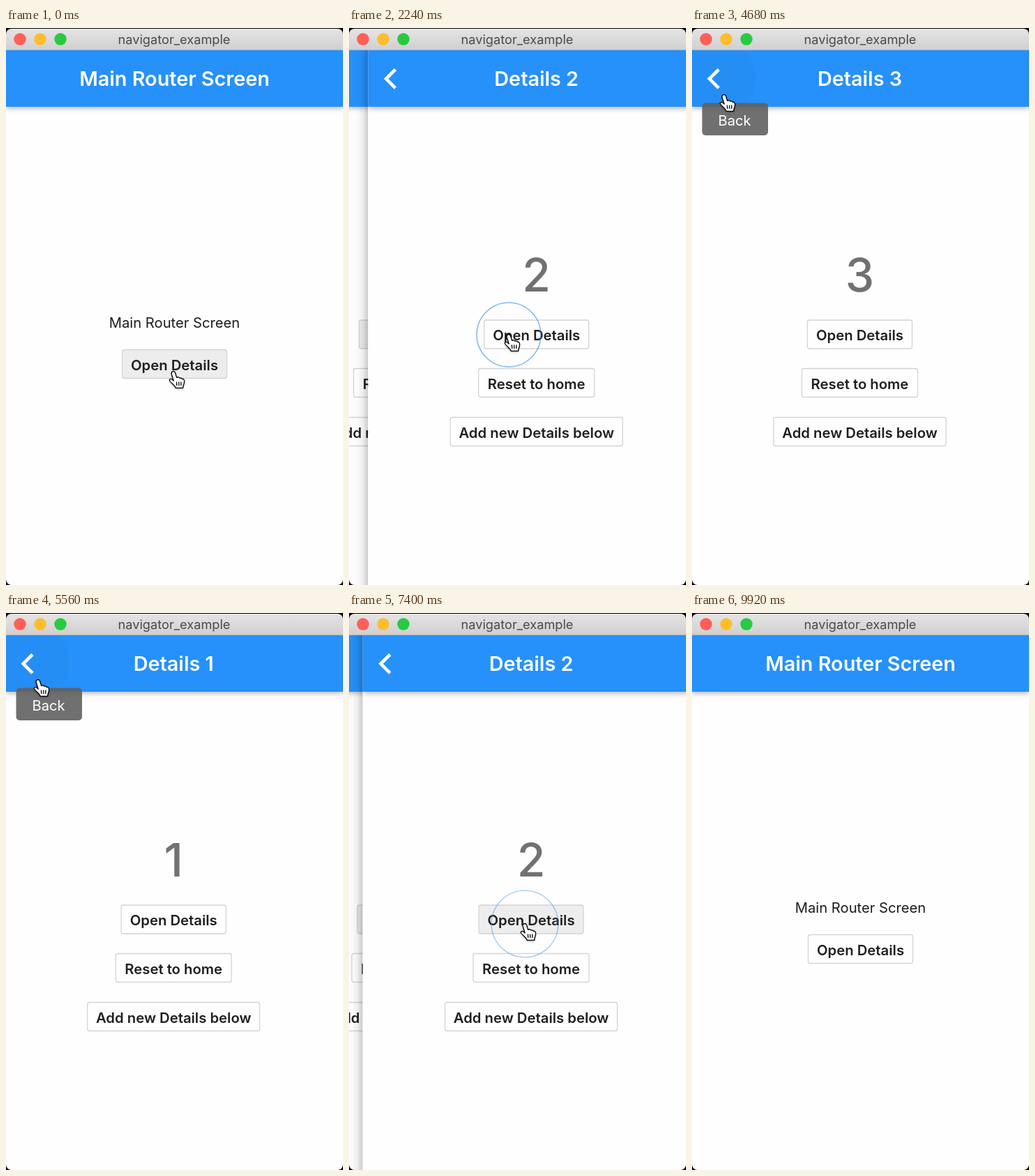
An HTML page with a canvas for the animation above (10000 ms loop, 483 px wide and 799 px high).

```html
<!DOCTYPE html>
<html>
<head>
<meta charset="utf-8">
<style>
  html, body { margin: 0; width: 100%; height: 100%; overflow: hidden; background: #000; }
  canvas { display: block; }
</style>
</head>
<body>
<canvas id="stage" width="483" height="799"></canvas>
<script>
const ctx = document.getElementById('stage').getContext('2d');
const W = 483, H = 799, LOOP = 10000, BAR_TOP = 32, BAR_BOTTOM = 113;
const MID = 241.5, SLIDE = 400, RING = 320;

// [click time, screen depth after it]; depth 0 is the main screen
const clicks = [
  [960, 1], [2018, 2], [2640, 3], [3240, 4],
  [4330, 3], [4800, 2], [5220, 1], [5620, 0],
  [6330, 1], [7156, 2], [7800, 3], [8820, 0]
];

// [move start, move end, x, y]
const moves = [
  [0, 0, 240, 493], [1350, 1750, 229, 440], [3640, 4120, 46, 96],
  [5740, 6220, 255, 496], [6620, 6940, 252, 446],
  [8200, 8520, 266, 516], [9040, 9560, 300, -40]
];

const mainButtons = [['Open Details', 166, 461, 151]];
const detailButtons = [
  ['Open Details', 166, 418.5, 151],
  ['Reset to home', 158, 488, 167],
  ['Add new Details below', 117.5, 558, 248]
];
const buttonsOf = depth => depth ? detailButtons : mainButtons;
const BUTTON_H = 42;

const hand = new Path2D('M-3 3C-3.2-1 1.6-1.8 2.6 1.8L4.6 8.4C6.2 7.2 8.4 7.8 8.7 9.2' +
  'C10.3 8.4 12 9.2 12.3 10.4C14.6 9.8 15.6 11.5 15.6 14C15.6 18 13.8 19 13.6 23.4H3.2' +
  'C2.4 20-2.6 17-5.4 13C-6.6 10.6-3.6 9.2-1.2 11.8L.2 13Z');
const handLines = new Path2D('M4.4 14.5L4.8 20M7.6 14.5L7.9 20M10.8 14.5L10.9 20');
const arrow = new Path2D('M0 0V19L4.5 15L7.3 21.6L10.5 20.2L7.7 13.8H13.6Z');

const clamp = v => Math.max(0, Math.min(1, v));
const inOut = p => p < .5 ? 4 * p ** 3 : 1 - 4 * (1 - p) ** 3;
const bezier = (s, a, b) => 3 * a * s * (1 - s) ** 2 + 3 * b * s * s * (1 - s) + s ** 3;

function slideEase(x) {
  if (x >= 1) return 1;
  let lo = 0, hi = 1;
  for (let i = 0; i < 24; i++) {
    const s = (lo + hi) / 2;
    if (bezier(s, .35, .33) < x) lo = s; else hi = s;
  }
  return bezier(lo, .91, .97);
}

function cursorAt(t) {
  let i = 0;
  while (i + 1 < moves.length && moves[i + 1][0] <= t) i++;
  const [start, end, x, y] = moves[i];
  if (t >= end) return { x, y, still: true };
  const [, , px, py] = moves[i - 1], p = inOut((t - start) / (end - start));
  return { x: px + (x - px) * p, y: py + (y - py) * p, still: false };
}

const overButton = (c, [, x, y, w]) => c.x >= x && c.x <= x + w && c.y >= y && c.y <= y + BUTTON_H;
const overBack = (c, depth) => depth > 0 && c.x < 72 && c.y > BAR_TOP && c.y < BAR_BOTTOM;

function text(str, x, y, size, weight, color) {
  ctx.font = `${weight} ${size}px Inter, "Open Sans", sans-serif`;
  ctx.textAlign = 'center';
  ctx.fillStyle = color;
  ctx.fillText(str, x, y);
}

function box(x, y, w, h, r, fill, stroke) {
  ctx.beginPath();
  ctx.roundRect(x, y, w, h, r);
  ctx.fillStyle = fill;
  ctx.fill();
  if (!stroke) return;
  ctx.strokeStyle = stroke;
  ctx.lineWidth = 1.3;
  ctx.stroke();
}

function disc(x, y, r, fill) {
  ctx.beginPath();
  ctx.arc(x, y, r, 0, 7);
  ctx.fillStyle = fill;
  ctx.fill();
}

function drawBar(depth, cursor) {
  ctx.save();
  ctx.shadowColor = 'rgba(0,0,0,.28)';
  ctx.shadowBlur = 7;
  ctx.shadowOffsetY = 2.5;
  ctx.fillStyle = '#2691fa';
  ctx.fillRect(0, BAR_TOP, W, BAR_BOTTOM - BAR_TOP);
  ctx.restore();
  text(depth ? 'Details ' + depth : 'Main Router Screen', MID, 83, 28.8, 600, '#fff');
  if (!depth) return;
  if (overBack(cursor, depth)) {
    ctx.save();
    ctx.beginPath();
    ctx.rect(0, BAR_TOP, W, BAR_BOTTOM - BAR_TOP);
    ctx.clip();
    disc(32, 72, 60, 'rgba(0,0,0,.025)');
    ctx.restore();
  }
  ctx.beginPath();
  ctx.moveTo(39.3, 59.5);
  ctx.lineTo(26, 72.8);
  ctx.lineTo(39.3, 86.1);
  ctx.strokeStyle = '#fff';
  ctx.lineWidth = 4.6;
  ctx.stroke();
}

function drawPage(depth, x, cursor, canHover, shadow) {
  ctx.save();
  ctx.translate(x, 0);
  if (shadow) {
    const g = ctx.createLinearGradient(0, 0, -24, 0);
    [[0, .22], [.3, .07], [.6, .016], [1, 0]].forEach(([at, a]) =>
      g.addColorStop(at, `rgba(0,0,0,${a * shadow})`));
    ctx.fillStyle = g;
    ctx.fillRect(-24, BAR_TOP, 24, H);
  }
  ctx.beginPath();
  ctx.rect(0, BAR_TOP, W, H);
  ctx.clip();
  ctx.fillStyle = '#fefefe';
  ctx.fillRect(0, BAR_TOP, W, H);
  drawBar(depth, cursor);
  if (depth) text(depth, MID, 377.5, 66, 500, '#717171');
  else text('Main Router Screen', MID, 430, 20.2, 400, '#1c1c1c');
  for (const b of buttonsOf(depth)) {
    const [label, bx, by, bw] = b;
    const lit = canHover && cursor.still && overButton(cursor, b);
    box(bx + .5, by + .5, bw - 1, BUTTON_H - 1, 3, lit ? '#ededed' : '#fefefe', '#d3d3d3');
    text(label, bx + bw / 2, by + 29.5, 20.3, 600, '#1f1f1f');
  }
  ctx.restore();
}

function drawPages(t, cursor) {
  let from = 0, to = 0, since = LOOP;
  for (const [time, depth] of clicks) {
    if (time > t) break;
    from = to;
    to = depth;
    since = t - time;
  }
  const p = slideEase(since / SLIDE), settled = since >= 230;
  if (p >= 1) {
    drawPage(to, 0, cursor, true, 0);
  } else if (to > from) {
    drawPage(from, -W / 3 * p, cursor, true, 0);
    drawPage(to, W * (1 - p), cursor, settled, p);
  } else {
    drawPage(to, -W / 3 * (1 - p), cursor, settled, 0);
    drawPage(from, W * p, cursor, true, 1 - p);
  }
  return to;
}

function drawTooltip(t) {
  const alpha = clamp((t - 4100) / 150) * clamp((5720 - t) / 100);
  if (!alpha) return;
  ctx.globalAlpha = alpha;
  box(14.5, 107.5, 94.5, 46.5, 5, 'rgba(97,97,97,.9)');
  text('Back', 61, 139.5, 20.2, 400, '#fff');
  ctx.globalAlpha = 1;
}

function drawTitleBar() {
  const g = ctx.createLinearGradient(0, 0, 0, BAR_TOP);
  g.addColorStop(0, '#e6e5e6');
  g.addColorStop(1, '#d0cfd0');
  ctx.fillStyle = g;
  ctx.fillRect(0, 0, W, BAR_TOP);
  ctx.fillStyle = '#b4b2b4';
  ctx.fillRect(0, BAR_TOP - 1, W, 1);
  ['#ff5f57', '#ffbd2e', '#28ca42'].forEach((c, i) => disc(20 + 29 * i, 16, 8.7, c));
  text('navigator_example', 241, 23, 18.2, 400, '#4a494a');
}

function drawRings(t) {
  for (const [time] of clicks) {
    const p = (t - time) / RING;
    if (p < 0 || p >= 1) continue;
    const c = cursorAt(time);
    ctx.beginPath();
    ctx.arc(c.x, c.y, 50.6 * (1 - (1 - p) ** 2), 0, 7);
    ctx.strokeStyle = `rgba(42,136,236,${Math.min(.8, 1.9 * (1 - p))})`;
    ctx.lineWidth = .4 + 4 * (1 - p);
    ctx.stroke();
  }
}

function drawCursor(c, depth) {
  const pointing = overBack(c, depth) || buttonsOf(depth).some(b => overButton(c, b));
  ctx.save();
  ctx.translate(c.x, c.y);
  ctx.lineJoin = 'round';
  ctx.shadowColor = 'rgba(0,0,0,.35)';
  ctx.shadowBlur = 3;
  ctx.shadowOffsetY = 1.5;
  ctx.fillStyle = pointing ? '#fff' : '#000';
  ctx.strokeStyle = pointing ? '#000' : '#fff';
  ctx.lineWidth = 1.3;
  const shape = pointing ? hand : arrow;
  ctx.fill(shape);
  ctx.shadowColor = 'transparent';
  ctx.stroke(shape);
  if (pointing) ctx.stroke(handLines);
  ctx.restore();
}

function draw(t) {
  const cursor = cursorAt(t);
  ctx.fillStyle = '#000';
  ctx.fillRect(0, 0, W, H);
  ctx.save();
  ctx.beginPath();
  ctx.roundRect(0, 1, W, H - 1, 8);
  ctx.clip();
  const depth = drawPages(t, cursor);
  drawTooltip(t);
  drawTitleBar();
  drawRings(t);
  drawCursor(cursor, depth);
  ctx.restore();
}

const start = performance.now();
function tick() {
  draw((performance.now() - start) % LOOP);
  requestAnimationFrame(tick);
}
tick();
</script>
</body>
</html>
```
